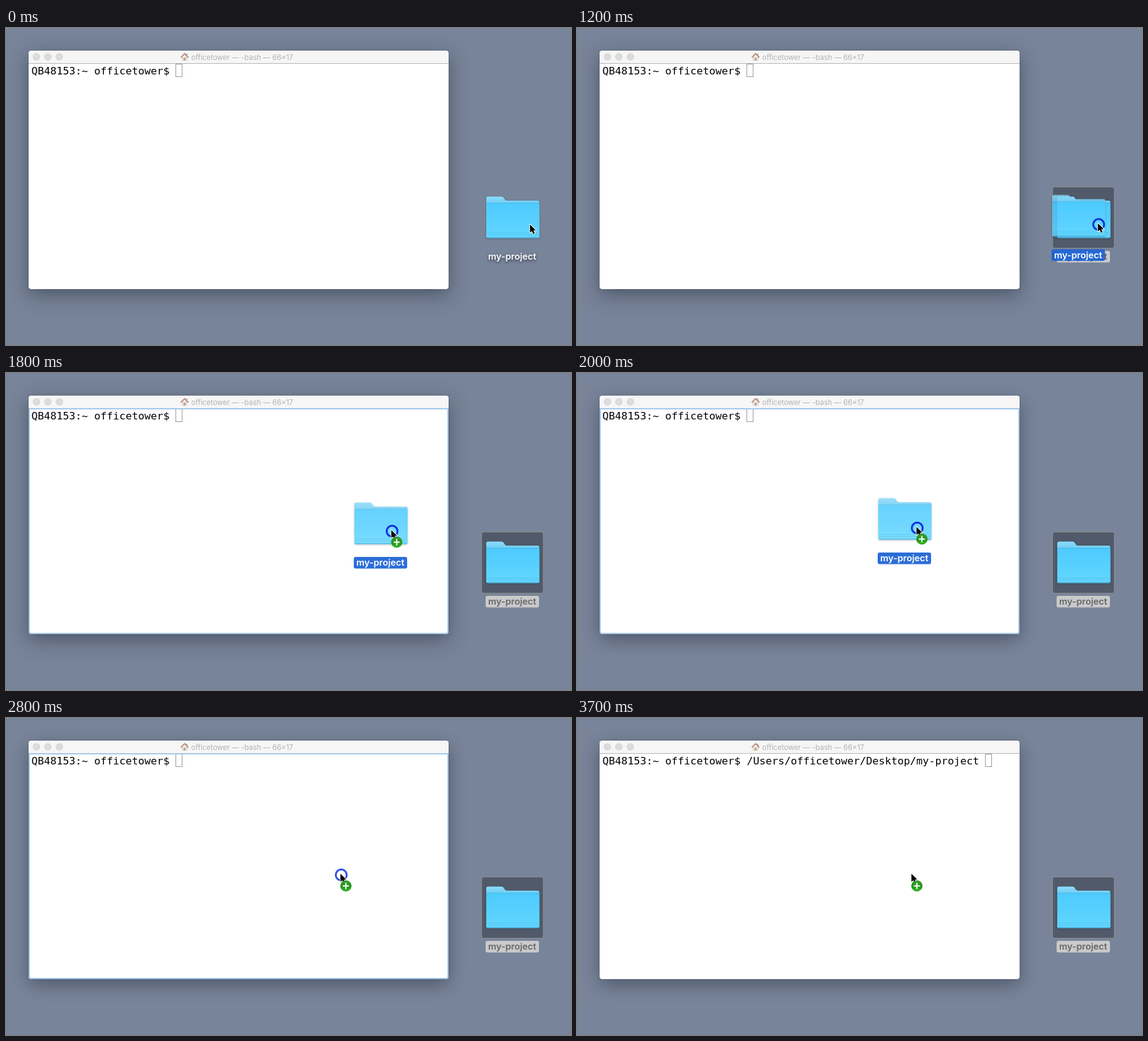
Animation of 900 by 505 pixels, one loop 8 s. Source, as an HTML page with a canvas:

```html
<!DOCTYPE html>
<html lang="en">
<head>
<meta charset="utf-8">
<title>Drag a folder into the terminal</title>
<style>
html, body { margin: 0; width: 100%; height: 100%; overflow: hidden; background: #788499; }
canvas { display: block; }
</style>
</head>
<body>
<canvas id="stage" width="900" height="505"></canvas>
<script>
const ctx = document.getElementById('stage').getContext('2d');
const LOOP = 8000, STEP = 100;
const SANS = 'Inter, "Open Sans", sans-serif';
const MONO = '16.61px "DejaVu Sans Mono", monospace';
const USER = 'officetower', HOST = 'QB48153';
const PROMPT = `${HOST}:~ ${USER}$ `;
const DROPPED = `/Users/${USER}/Desktop/my-project `;
const WIN = { x: 36, y: 36, w: 669, h: 380 };
const HOME = { x: 836, y: 315 };

// time, x and y offsets from the resting place
const POINTER = [[1100, 0, 0], [1200, -5, -2], [1400, -48, -22], [1600, -122, -47],
  [1800, -221, -63], [2000, -294, -68], [2200, -302, -66], [2400, -302, -65]];
const DRAGGED = [[1100, 0, 0], [1200, -8, -2.5], [1400, -46, -20], [1600, -116, -44.5],
  [1800, -210, -62], [2000, -285, -69], [2200, -302, -67], [2400, -304, -65]];

// Catmull-Rom through evenly weighted keys
function along(keys, t) {
  const last = keys.length - 1;
  if (t <= keys[0][0]) return { x: keys[0][1], y: keys[0][2] };
  if (t >= keys[last][0]) return { x: keys[last][1], y: keys[last][2] };
  const i = keys.findIndex(k => k[0] > t) - 1;
  const a = keys[Math.max(0, i - 1)], b = keys[i], c = keys[i + 1], d = keys[Math.min(last, i + 2)];
  const span = c[0] - b[0], u = (t - b[0]) / span;
  const axis = n => {
    const m0 = (c[n] - a[n]) / (c[0] - a[0]) * span;
    const m1 = (d[n] - b[n]) / (d[0] - b[0]) * span;
    return b[n] * (1 + 2 * u) * (1 - u) ** 2 + m0 * u * (1 - u) ** 2
      + c[n] * u * u * (3 - 2 * u) + m1 * u * u * (u - 1);
  };
  return { x: axis(1), y: axis(2) };
}

function box(c, x, y, w, h, r, fill) {
  c.beginPath();
  c.roundRect(x, y, w, h, r);
  if (fill) { c.fillStyle = fill; c.fill(); }
}

function disc(x, y, r, fill) {
  ctx.beginPath();
  ctx.arc(x, y, r, 0, Math.PI * 2);
  ctx.fillStyle = fill;
  ctx.fill();
}

function text(str, x, y, font, fill, align = 'left') {
  ctx.font = font;
  ctx.textAlign = align;
  ctx.fillStyle = fill;
  ctx.fillText(str, x, y);
}

function shadow(c, color, blur, dy) {
  c.shadowColor = color;
  c.shadowBlur = blur;
  c.shadowOffsetY = dy;
}

function vertical(c, y0, y1, ...colors) {
  const g = c.createLinearGradient(0, y0, 0, y1);
  colors.forEach((color, i) => g.addColorStop(i / (colors.length - 1), color));
  return g;
}

function makeFolder() {
  const art = document.createElement('canvas');
  art.width = 100;
  art.height = 90;
  const c = art.getContext('2d');
  c.translate(8, 8);
  shadow(c, 'rgba(30,40,60,.4)', 3, 1);
  c.beginPath();
  c.moveTo(0, 3);
  c.quadraticCurveTo(0, .5, 3, .5);
  c.lineTo(24, .5);
  c.quadraticCurveTo(27, .5, 28.5, 3.5);
  c.quadraticCurveTo(30.5, 7, 33, 7);
  c.lineTo(82, 7);
  c.quadraticCurveTo(84.5, 7, 84.5, 10);
  c.lineTo(84.5, 64);
  c.quadraticCurveTo(84.5, 66.5, 82, 66.5);
  c.lineTo(2.5, 66.5);
  c.quadraticCurveTo(0, 66.5, 0, 64);
  c.closePath();
  c.fillStyle = vertical(c, 0, 12, '#8adcfb', '#70cdf2');
  c.fill();
  shadow(c, 'transparent', 0, 0);
  box(c, 0, 11, 84.5, 55.5, [2, 2, 2.5, 2.5], vertical(c, 11, 66, '#4ecbff', '#57d0ff', '#64d7ff'));
  c.fillStyle = 'rgba(45,165,215,.55)';
  c.fillRect(0, 10.5, 84.5, 1);
  c.fillStyle = 'rgba(50,165,215,.35)';
  c.fillRect(1, 58, 82.5, 1);
  c.fillRect(1, 61, 82.5, 1);
  c.fillStyle = 'rgba(50,150,200,.55)';
  c.fillRect(1, 65, 82.5, 1.5);
  return art;
}
const folderArt = makeFolder();

function folder(dx = 0, dy = 0) {
  ctx.drawImage(folderArt, 757 + dx, 260 + dy);
}

function label(dx, dy, color) {
  text('my-project', 806.3 + dx, 369 + dy, `600 14.5px ${SANS}`, color, 'center');
}

function house() {
  ctx.fillStyle = '#e3dccf';
  ctx.fillRect(280, 46, 9, 6);
  ctx.fillStyle = '#b9a79b';
  ctx.fillRect(283, 47.5, 3, 4.5);
  ctx.fillRect(287, 41, 2, 4);
  ctx.beginPath();
  ctx.moveTo(278.5, 47);
  ctx.lineTo(284.5, 41);
  ctx.lineTo(290.5, 47);
  ctx.strokeStyle = '#b98f84';
  ctx.lineWidth = 2;
  ctx.stroke();
}

function terminal(t) {
  const { x, y, w, h } = WIN;
  const hot = t >= 1800 && t < 2900;
  const done = t >= 2900;

  ctx.save();
  shadow(ctx, 'rgba(35,42,62,.5)', 30, 9);
  box(ctx, x, y, w, h, 4.5, '#fff');
  shadow(ctx, 'rgba(35,42,62,.45)', 2, 0);
  ctx.fill();
  ctx.restore();

  box(ctx, x, y, w, 20, [4.5, 4.5, 0, 0], '#f6f6f6');
  ctx.fillStyle = '#b4b6b8';
  ctx.fillRect(x, 56, w, 1);
  for (const cx of [48.5, 66.7, 85]) {
    disc(cx, 46, 5.8, '#cfcfcf');
    disc(cx, 46, 5, '#dcdcdc');
  }
  house();
  text(`${USER} — -bash — 66×17`, 295, 50.5, `11.5px ${SANS}`, '#b3b3b3');

  const line = PROMPT + (done ? DROPPED : '');
  text(line, 40.5, 74, MONO, '#000');
  ctx.strokeStyle = '#9a9a9a';
  ctx.lineWidth = 1;
  ctx.strokeRect(40.5 + line.length * 10, 57.5, 10, 20);

  if (hot) {
    box(ctx, x + 1, 57, w - 2, 358, [0, 0, 4, 4]);
    ctx.strokeStyle = '#a3c9ec';
    ctx.lineWidth = 2;
    ctx.stroke();
  }
}

function desktopIcon(selected) {
  if (selected) {
    box(ctx, 757.5, 253, 98.5, 98, 4, '#515a6a');
    ctx.strokeStyle = '#868c93';
    ctx.lineWidth = 1.3;
    ctx.stroke();
    box(ctx, 764, 355, 85, 18.5, 3, '#cacaca');
  }
  folder();
  ctx.save();
  if (!selected) shadow(ctx, 'rgba(20,28,45,.75)', 4, 1.5);
  label(0, 0, selected ? '#66676a' : '#fff');
  ctx.restore();
}

function dragImage(t) {
  const { x, y } = along(DRAGGED, t);
  ctx.save();
  ctx.globalAlpha = .86;
  folder(x, y);
  ctx.globalAlpha = .93;
  box(ctx, 764 + x, 355 + y, 85, 18.5, 3, '#1d62d6');
  ctx.globalAlpha = 1;
  label(x, y, '#fff');
  ctx.restore();
}

function ring(x, y, t) {
  if (t < 500 || t >= 3700) return;
  let r = 8.7, alpha = t < 600 ? .6 : 1;
  if (t >= 2800) {
    const late = t >= 3100 ? Math.floor((t - 3100) / 200) * 200 + 3100 : t;
    const u = (late - 2700) / 900;
    r += 11 * Math.max(0, u - .11);
    alpha = .95 - u;
  }
  ctx.beginPath();
  ctx.arc(x, y, r, 0, Math.PI * 2);
  ctx.strokeStyle = `rgba(15,50,220,${alpha})`;
  ctx.lineWidth = 3;
  ctx.stroke();
}

function arrow(x, y) {
  ctx.save();
  ctx.translate(x - 1.3, y - 2);
  ctx.beginPath();
  ctx.moveTo(0, 0);
  for (const [px, py] of [[0, 13], [3, 10.4], [5.2, 15.2], [7.6, 14.2], [5.5, 9.5], [9.3, 9.3]]) ctx.lineTo(px, py);
  ctx.closePath();
  ctx.lineJoin = 'round';
  ctx.strokeStyle = '#fff';
  ctx.lineWidth = 2;
  ctx.stroke();
  ctx.fillStyle = '#000';
  ctx.fill();
  ctx.restore();
}

function badge(x, y) {
  disc(x, y, 9, vertical(ctx, y - 9, y + 9, '#3f9a38', '#219415', '#38b52a'));
  ctx.fillStyle = '#fff';
  ctx.fillRect(x - 5, y - 1, 10, 2);
  ctx.fillRect(x - 1, y - 5, 2, 10);
}

function draw(t) {
  ctx.fillStyle = '#788499';
  ctx.fillRect(0, 0, 900, 505);
  terminal(t);
  desktopIcon(t >= 500);
  if (t >= 1200 && t < 2800) dragImage(t);
  const move = along(POINTER, t);
  const x = HOME.x + move.x, y = HOME.y + move.y;
  ring(x, y, t);
  arrow(x, y);
  if (t >= 1800) badge(x + 7.4, y + 17.5);
}

const start = performance.now();
function tick() {
  const t = (performance.now() - start) % LOOP;
  draw(Math.floor(t / STEP) * STEP);
  requestAnimationFrame(tick);
}
tick();
</script>
</body>
</html>
```
